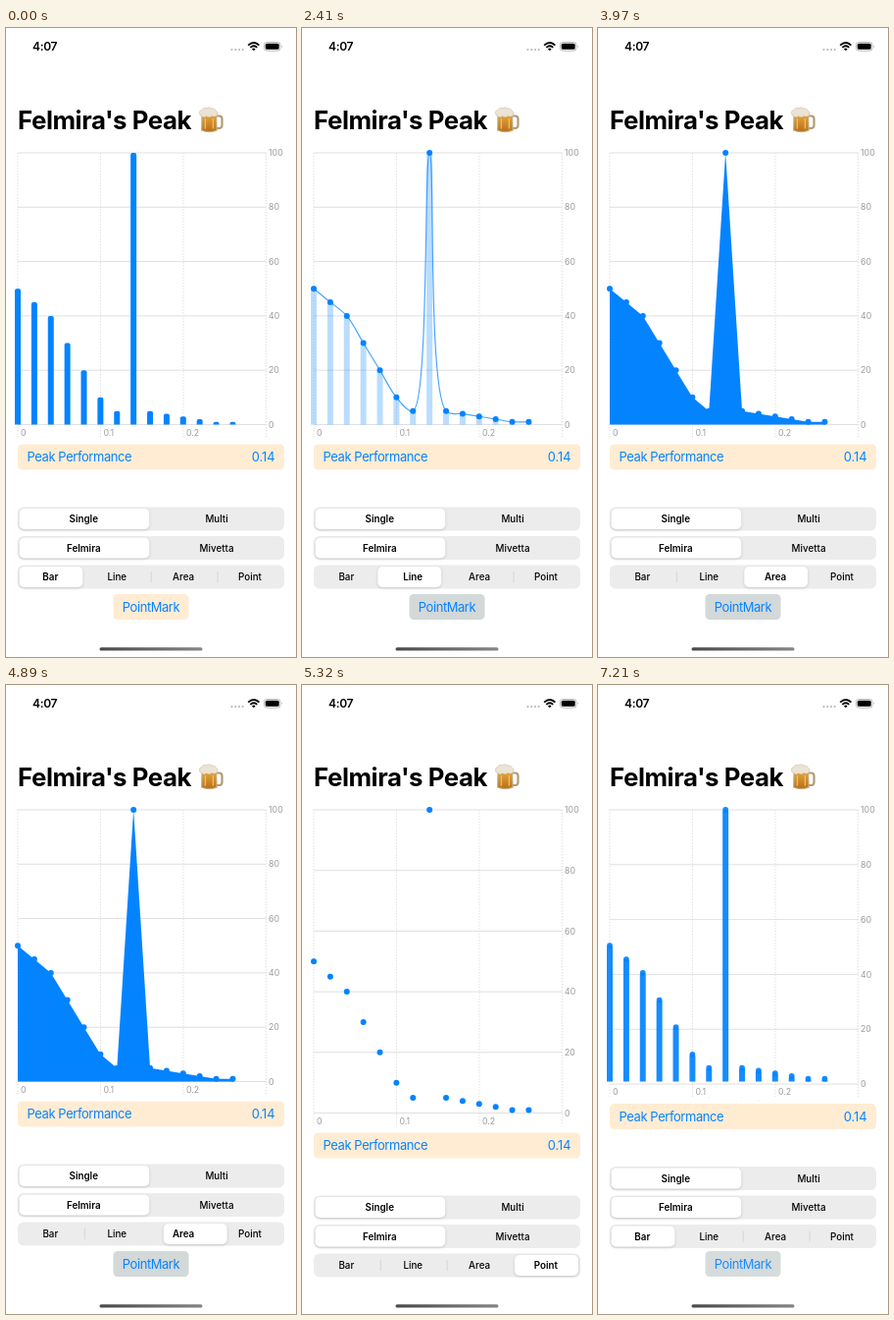
Write an HTML page that moves like this. It is 296x640 px and loops after 7.99 s.

```html
<!DOCTYPE html>
<html lang="en">
<head>
<meta charset="utf-8">
<title>Chart styles</title>
<style>
  html, body { margin: 0; width: 100%; height: 100%; overflow: hidden; background: #fff; }
  svg { display: block; width: 296px; height: 640px; font-family: Inter, Roboto, sans-serif; }
  .blue { fill: #0483ff; }
  .big { font-size: 12.9px; letter-spacing: -.38px; }
  .axis { font-size: 8.8px; fill: #9b9b9f; }
  .grid { stroke: #d9d9db; stroke-width: .8; }
  .dash { stroke-dasharray: 1.5 1.5; }
  .seg { font-size: 9.8px; font-weight: 500; text-anchor: middle; }
  .seg.on { font-weight: 600; }
  .track { fill: #ececed; }
  .thumb { fill: #fff; filter: drop-shadow(0 1px 1.5px rgba(0, 0, 0, .16)); }
</style>
</head>
<body>
<svg viewBox="0 0 296 640">
  <defs>
    <linearGradient id="beer" x2="0" y2="1">
      <stop offset="0" stop-color="#e3a33a"/><stop offset="1" stop-color="#b8701a"/>
    </linearGradient>
    <linearGradient id="bar">
      <stop offset="0" stop-color="#4a4a4a"/><stop offset="1" stop-color="#858585"/>
    </linearGradient>
  </defs>
  <g id="status">
    <text x="27" y="23" font-size="12" font-weight="600" letter-spacing="-.3">4:07</text>
    <g fill="#b8b8ba">
      <circle cx="230.5" cy="22" r="1.1"/><circle cx="234.3" cy="22" r="1.1"/>
      <circle cx="238" cy="22" r="1.1"/><circle cx="241.6" cy="22" r="1.1"/>
    </g>
    <g fill="none" stroke="#000" stroke-width="1.9">
      <path d="M247.2 17.6Q252.8 12.4 258.4 17.6"/>
      <path d="M249.4 19.9Q252.8 16.8 256.2 19.9"/>
    </g>
    <path d="M251 21.4Q252.8 19.8 254.6 21.4L252.8 23.3Z"/>
    <rect x="263.5" y="14.5" width="16.5" height="8.6" rx="2.6" fill="none" stroke="#a5a5a7" stroke-width=".8"/>
    <rect x="264.8" y="15.8" width="13.9" height="6" rx="1.5"/>
    <path d="M281 17.3Q282.4 18.8 281 20.3Z" fill="#a5a5a7"/>
  </g>

  <text x="12" y="103" font-size="25.8" font-weight="700" letter-spacing="-.42">Felmira's Peak</text>
  <g id="mug">
    <path d="M214.5 89.5h3q3 0 3 3v6.5q0 3-3 3h-3" fill="none" stroke="#b39a78" stroke-width="2.2"/>
    <path d="M199.5 87h15.6l.6 17.5q-8 3.4-16.6 0Z" fill="#c4a878"/>
    <path d="M200.7 89h13.2l.5 14.8q-6.8 2.4-14 0Z" fill="url(#beer)"/>
    <path d="M203.4 92v10.5M211.4 92v10.5" stroke="#f0bd62" stroke-width="1.4"/>
    <path d="M198.4 89q-2.6-4.6 1.6-5.8q1.4-2.6 4.6-1.6q3-1.6 5.2.2q3.6-.4 4.4 2.2q3.4 2.2 1 5.2q-3 1.6-5 .4q-2.6 2-5.2.2q-3 2-6.6-.8Z" fill="#ebe3d4" stroke="#cdbfa6" stroke-width=".6"/>
  </g>

  <g id="axes"></g>
  <g id="marks" class="blue"></g>

  <g id="lower">
    <rect x="12" y="423.5" width="272" height="26" rx="4.5" fill="#ffecd3"/>
    <text class="blue big" x="21.5" y="441.2">Peak Performance</text>
    <text class="blue" font-size="12.9" x="274.7" y="441.2" text-anchor="end">0.14</text>
  </g>

  <g id="button">
    <rect id="plate" x="109.5" y="576" width="77" height="26" rx="4.5"/>
    <text class="blue big" x="148" y="593.8" text-anchor="middle">PointMark</text>
  </g>
  <rect x="95.5" y="630.2" width="105" height="3.4" rx="1.7" fill="url(#bar)"/>
</svg>
<script>
const $ = id => document.getElementById(id);
const lerp = (a, b, p) => a + (b - a) * p;

function add(parent, tag, attrs, text) {
  const el = document.createElementNS('http://www.w3.org/2000/svg', tag);
  for (const key in attrs) el.setAttribute(key, attrs[key]);
  if (text !== undefined) el.textContent = text;
  return parent.appendChild(el);
}

const LEFT = 12, RIGHT = 265.5, TOP = 127, BASE = 403.5, GROW = 32;
const values = [50, 45, 40, 30, 20, 10, 5, 100, 5, 4, 3, 2, 1, 1];
const place = base => values.map((v, i) => [LEFT + i * 16.88, lerp(base, TOP, v / 100)]);
const pts = place(BASE);

// Axes
const columns = [0, 1, 2, 3].map(i => {
  const x = LEFT + i * 84.5;
  return {
    line: add($('axes'), 'line', { class: 'grid dash', x1: x, x2: x, y1: TOP }),
    label: i < 3 && add($('axes'), 'text', { class: 'axis', x: x + 3 }, i ? '0.' + i : '0')
  };
});
const rows = [0, 20, 40, 60, 80, 100].map(v => ({
  v,
  line: add($('axes'), 'line', { class: 'grid', x1: LEFT, x2: RIGHT }),
  label: add($('axes'), 'text', { class: 'axis', x: RIGHT + 2.5 }, v)
}));

function layoutAxes(base) {
  for (const { line, label } of columns) {
    line.setAttribute('y2', base + 13);
    if (label) label.setAttribute('y', base + 11.4);
  }
  for (const { v, line, label } of rows) {
    const y = lerp(base, TOP, v / 100);
    line.setAttribute('y1', y);
    line.setAttribute('y2', y);
    label.setAttribute('y', y + 3.1);
  }
}

// Centripetal Catmull-Rom spline as cubic Béziers
function spline(p) {
  const gap = (a, b) => Math.sqrt(Math.hypot(b[0] - a[0], b[1] - a[1])) || 1;
  const handle = (a, b, c, len) => [0, 1].map(k => {
    const u = gap(a, b), v = gap(b, c);
    return len / 3 * ((b[k] - a[k]) / u - (c[k] - a[k]) / (u + v) + (c[k] - b[k]) / v);
  });
  let d = 'M' + p[0];
  for (let i = 0; i < p.length - 1; i++) {
    const b = p[i], c = p[i + 1], len = gap(b, c);
    const h1 = i ? handle(p[i - 1], b, c, len) : [(c[0] - b[0]) / 3, (c[1] - b[1]) / 3];
    const h2 = p[i + 2] ? handle(b, c, p[i + 2], len) : [(c[0] - b[0]) / 3, (c[1] - b[1]) / 3];
    d += `C${b[0] + h1[0]},${b[1] + h1[1]} ${c[0] - h2[0]},${c[1] - h2[1]} ${c}`;
  }
  return d;
}

// Marks
const group = () => add($('marks'), 'g', {});
const dots = base => {
  const g = group();
  for (const [cx, cy] of place(base)) add(g, 'circle', { cx, cy });
  return g;
};
const bars = group(), line = group(), area = group();
for (const [x, y] of pts) {
  const r = Math.min(2, BASE - y);
  add(bars, 'path', { d: `M${x - 3} ${BASE}V${y + r}q0 ${-r} ${r} ${-r}h${6 - 2 * r}q${r} 0 ${r} ${r}V${BASE}Z` });
}
const curve = add(line, 'path', { d: spline(pts), fill: 'none', stroke: '#0483ff' });
add(area, 'path', { d: `M${LEFT} ${BASE}L${pts.join('L')}V${BASE}Z` });
const dotsShort = dots(BASE), dotsTall = dots(BASE + GROW);

// Dots grow in area as they fade in
function showDots(g, amount) {
  g.style.opacity = amount;
  for (const dot of g.children) dot.setAttribute('r', 3 * Math.sqrt(amount));
}

// Segmented controls
function segmented(y, names) {
  const w = 271.5 / names.length;
  add($('lower'), 'rect', { class: 'track', x: 12, y, width: 272, height: 24, rx: 6 });
  const rules = names.slice(1).map((_, i) => add($('lower'), 'rect',
    { x: 12 + w * (i + 1), y: y + 6.5, width: .8, height: 11, fill: '#cfcfd2' }));
  const thumb = add($('lower'), 'rect',
    { class: 'thumb', y: y + 1.5, width: w - 3, height: 21, rx: 5 });
  const labels = names.map((name, i) => add($('lower'), 'text',
    { class: 'seg', x: 11.4 + w * (i + .5), y: y + 15.5 }, name));
  return (pos, sel) => {
    thumb.setAttribute('x', 13.5 + w * pos);
    labels.forEach((el, i) => el.classList.toggle('on', i === sel));
    rules.forEach((el, i) => el.style.opacity = i === sel || i + 1 === sel ? 0 : 1);
  };
}
segmented(487.5, ['Single', 'Multi'])(0, 0);
segmented(517, ['Felmira', 'Mivetta'])(0, 0);
const setKind = segmented(546.5, ['Bar', 'Line', 'Area', 'Point']);

// Each change: start, end, kinds, and per-step progress of marks and thumb
const LOOP = 7990;
const changes = [
  { at: 500, end: 1070, from: 0, to: 0, fade: [0, 0, .12, .5, .92, 1], slide: [0], press: [.5, .35, .5, .75, 1, 1] },
  { at: 2070, end: 2620, from: 0, to: 1, fade: [0, .05, .33, .73, .97, 1], slide: [0, .17, .7, .94, 1, 1] },
  { at: 3530, end: 3970, from: 1, to: 2, fade: [0, .17, .55, .92, 1], slide: [.17, .7, .95, 1, 1] },
  { at: 4890, end: 5320, from: 2, to: 3, fade: [0, .17, .55, .92, 1], slide: [.17, .7, .95, 1, 1] },
  { at: 6910, end: 7210, from: 3, to: 0, fade: [0, .17, .55, .92], slide: [.17, .7, .95, 1] }
];

function render(t) {
  const c = changes.filter(s => s.at <= t).pop() || changes[0];
  const last = c.fade.length - 1, started = t >= c.at;
  const step = Math.min(last, Math.floor((t - c.at) / (c.end - c.at) * last + .01));
  const pick = list => list[Math.min(step, list.length - 1)];
  const p = started ? pick(c.fade) : 0;
  const slide = started ? pick(c.slide) : 0;
  const first = c === changes[0];

  const weight = [0, 0, 0, 0];
  weight[c.from] += 1 - p;
  weight[c.to] += p;
  [bars, line, area].forEach((g, i) => g.style.opacity = weight[i]);
  curve.setAttribute('stroke-width', 1.6 * weight[1]);
  const tall = weight[3], on = first ? p : 1;
  showDots(dotsShort, on * (1 - tall));
  showDots(dotsTall, tall);

  layoutAxes(BASE + GROW * tall);
  $('lower').setAttribute('transform', `translate(0 ${GROW * tall})`);
  setKind(lerp(c.from, c.to, slide), slide > .2 ? c.to : c.from);

  const mix = (a, b) => Math.round(lerp(a, b, on));
  $('plate').style.fill = `rgb(${mix(255, 211)},${mix(236, 216)},${mix(211, 216)})`;
  $('button').style.opacity = first && started ? pick(c.press) : 1 - tall;
}

const start = performance.now();
function tick() {
  render((performance.now() - start) % LOOP);
  requestAnimationFrame(tick);
}
tick();
</script>
</body>
</html>
```
